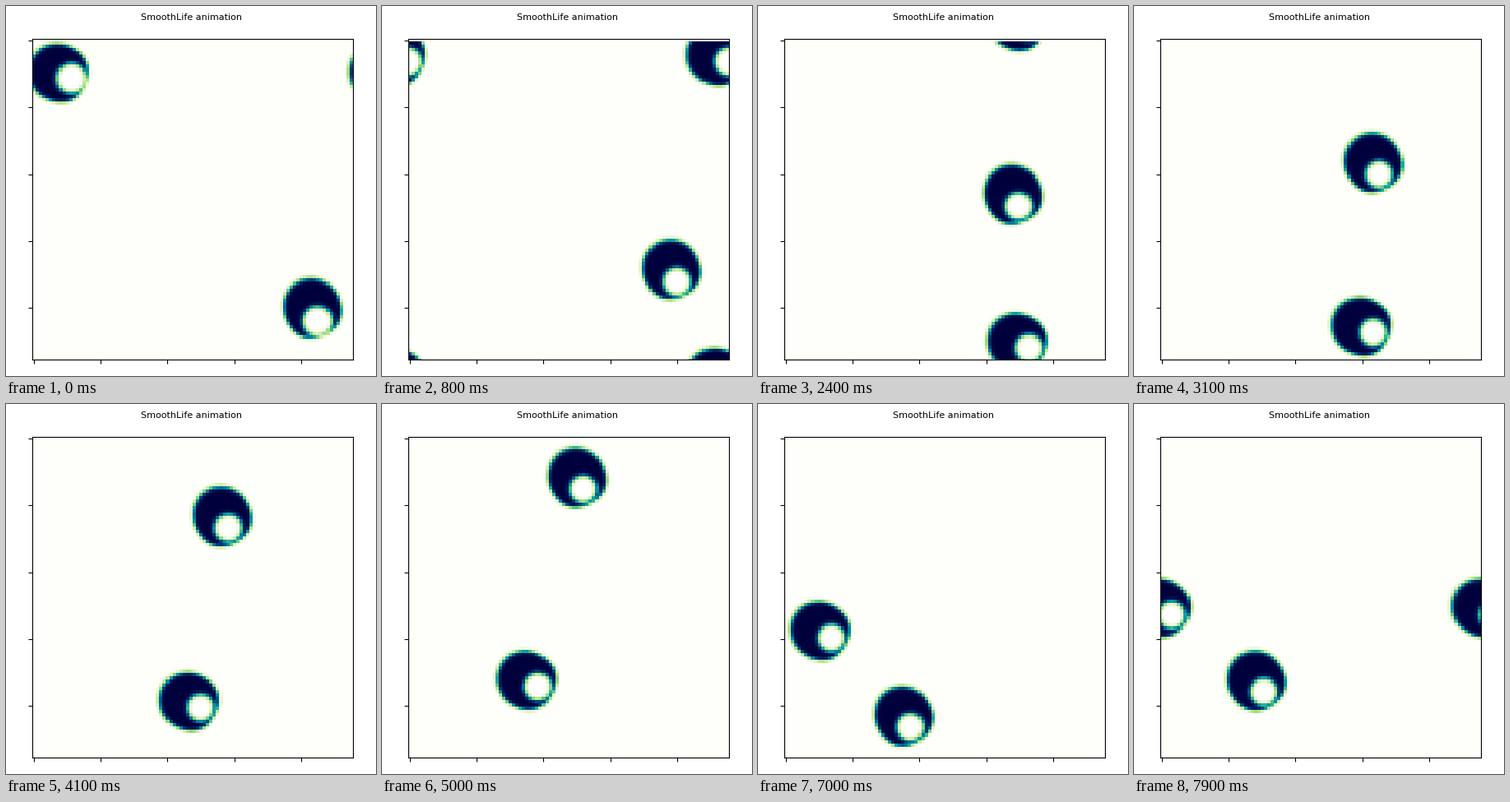
These frames come from a looping animation (450 by 450 pixels, 8000 ms). A matplotlib script:

```python
import numpy as np
import matplotlib.pyplot as plt
from matplotlib.animation import FuncAnimation
from matplotlib.colors import LinearSegmentedColormap

SIZE = 450
N = 96               # cells per side of the wrapped world
SIDE = 390
CELL = SIDE / N      # pixels per cell
LEFT, TOP = 31.9, 40.0
SHIFT = 3            # the image sits slightly below the axes top
FRAMES, STEP = 80, 100

cmap = LinearSegmentedColormap.from_list("pond", [
    (0.00, "#ffffff"), (0.01, "#fefffa"), (0.12, "#e0f2bf"),
    (0.25, "#ade387"), (0.40, "#59c487"), (0.55, "#0d9e9e"),
    (0.70, "#00789e"), (0.85, "#00336b"), (1.00, "#00003d"),
], N=512)

Y, X = np.mgrid[:N, :N]


def wrap(d):
    return (d + N / 2) % N - N / 2


def sigmoid(z):
    return 1 / (1 + np.exp(-np.clip(z, -40, 40)))


def travel(t):
    """Steep and shallow components of the slowly turning path, with speeds."""
    fast = -59.6 * t + 0.8 * t**2, -59.6 + 1.6 * t
    slow = -25.0 * t - 0.42 * t**2, -25.0 - 0.84 * t
    return fast, slow


def glider(x, y, vx, vy, t):
    """Body, and the part outside its hole, for a centre given in pixels."""
    speed = np.hypot(vx, vy)
    ux, uy = -vx / speed, -vy / speed          # points to the rear
    dx = wrap(X + 0.5 - (x - LEFT) / CELL)
    dy = wrap(Y + 0.5 - (y - TOP - SHIFT) / CELL)
    along = dx * ux + dy * uy
    across = dy * ux - dx * uy
    dist = np.hypot(along, across) + 1e-6

    # Round, soft front and blunt, crisp rear
    power = np.where(along > 0, 2.3, 2.0)
    radius = (np.abs(along / 8.85)**power
              + np.abs(across / 8.5)**power)**(1 / power)
    body = sigmoid((3.3 + 0.6 * along / dist) * 8.7 * (1 - radius))

    young = np.exp(-t / 0.7)
    hole = np.hypot(along - 4.1 - 0.3 * young, across)
    return body, sigmoid(2.7 * (hole - 4.0 - 0.4 * young))


def field(t):
    (fast, vfast), (slow, vslow) = travel(t)
    pair = [glider(372 + slow, 367 + fast, vslow, vfast, t),
            glider(63 + fast, 81 + slow, vfast, vslow, t)]
    v = np.full((N, N), 0.01)
    for body, outside in pair:
        v = np.maximum(v, body) * outside
    return v


fig = plt.figure(figsize=(SIZE / 100, SIZE / 100), dpi=100, facecolor="white")
fig.suptitle("SmoothLife animation", fontsize=8)
ax = fig.add_axes([LEFT / SIZE, (SIZE - TOP - SIDE) / SIZE,
                   SIDE / SIZE, SIDE / SIZE])
off = SHIFT / CELL
image = ax.imshow(field(0), cmap=cmap, vmin=0, vmax=1,
                  interpolation="nearest", aspect="auto",
                  extent=(-0.5, N - 0.5, N - 0.5 + off, -0.5 + off))
ax.set(xlim=(-0.5, N - 0.5), ylim=(N - 0.5, -0.5),
       xticks=range(0, N, 20), yticks=range(0, N, 20))
ax.tick_params(labelbottom=False, labelleft=False)


def update(i):
    image.set_data(field(i * STEP / 1000))
    return [image]


anim = FuncAnimation(fig, update, frames=FRAMES, interval=STEP,
                     repeat=True, repeat_delay=0, blit=False)
plt.show()
```
